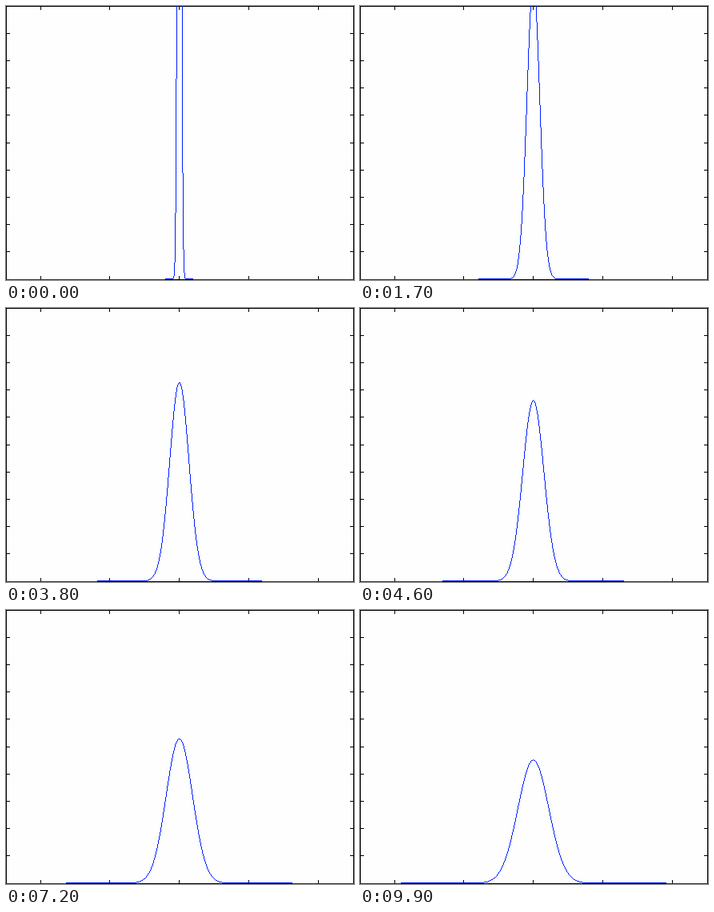
Recreate the animation shown at these times as a matplotlib script. Size 435 by 343 pixels, loop 10 s.

```python
import numpy as np
import matplotlib.pyplot as plt
from matplotlib.animation import FuncAnimation

W, H = 435, 343
DPI = 64
FRAMES, INTERVAL = 100, 100

PAPER, INK, BLUE = (254, 254, 254), (0, 0, 0), (0, 32, 255)
CENTER = 216.7
FLOOR = H - 1            # row of the bottom axis
SIGMA, PEAK = 1.945, 1533.5
TICK = 5

cols = np.arange(W)
rows = np.arange(FLOOR)


def make_box():
    """Blank plot: black frame with inward ticks on all four sides."""
    img = np.full((H, W, 3), PAPER, dtype=np.uint8)
    img[[0, -1], :] = INK
    img[:, [0, -1]] = INK
    for x in (43, 129, 216, 303, 390):
        img[:TICK, x] = img[-TICK:, x] = INK
    for k in range(1, 10):
        y = int(34.2 * k)
        img[y, :TICK] = img[y, -TICK:] = INK
    return img


def time_step(i):
    """Diffusion time; the first step is held and step 69 is skipped."""
    return 70 if i == 69 else max(i, 1)


def draw_bell(img, n):
    """One-pixel outline of a Gaussian that has spread for n steps."""
    root = np.sqrt(n)
    sigma, peak = SIGMA * root, PEAK / root

    # Shallow parts: one pixel per column, lifted wherever it is not zero.
    dist = cols + 0.5 - CENTER
    y = np.floor(FLOOR - peak * np.exp(-0.5 * (dist / sigma) ** 2))
    reach = 16.6 * root + 0.7
    y = np.where(np.abs(dist) < reach, np.minimum(y, FLOOR - 1), FLOOR).astype(int)
    seen = y >= 0
    img[y[seen], cols[seen]] = BLUE

    # Steep parts: one pixel per row on each flank.
    level = FLOOR - rows - 0.5
    cut = level < peak
    half = sigma * np.sqrt(2 * np.log(peak / level[cut]))
    for x in (CENTER - half, CENTER + half):
        img[rows[cut], np.floor(x).astype(int)] = BLUE


def render(i):
    img = box.copy()
    draw_bell(img, time_step(i))
    return img


box = make_box()
fig = plt.figure(figsize=(W / DPI, H / DPI), dpi=DPI)
ax = fig.add_axes([0, 0, 1, 1])
ax.axis("off")
view = ax.imshow(render(0), interpolation="nearest", aspect="auto")


def update(i):
    view.set_data(render(i))
    return view,


anim = FuncAnimation(fig, update, frames=FRAMES, interval=INTERVAL,
                     repeat=True, repeat_delay=0)
plt.show()
```
